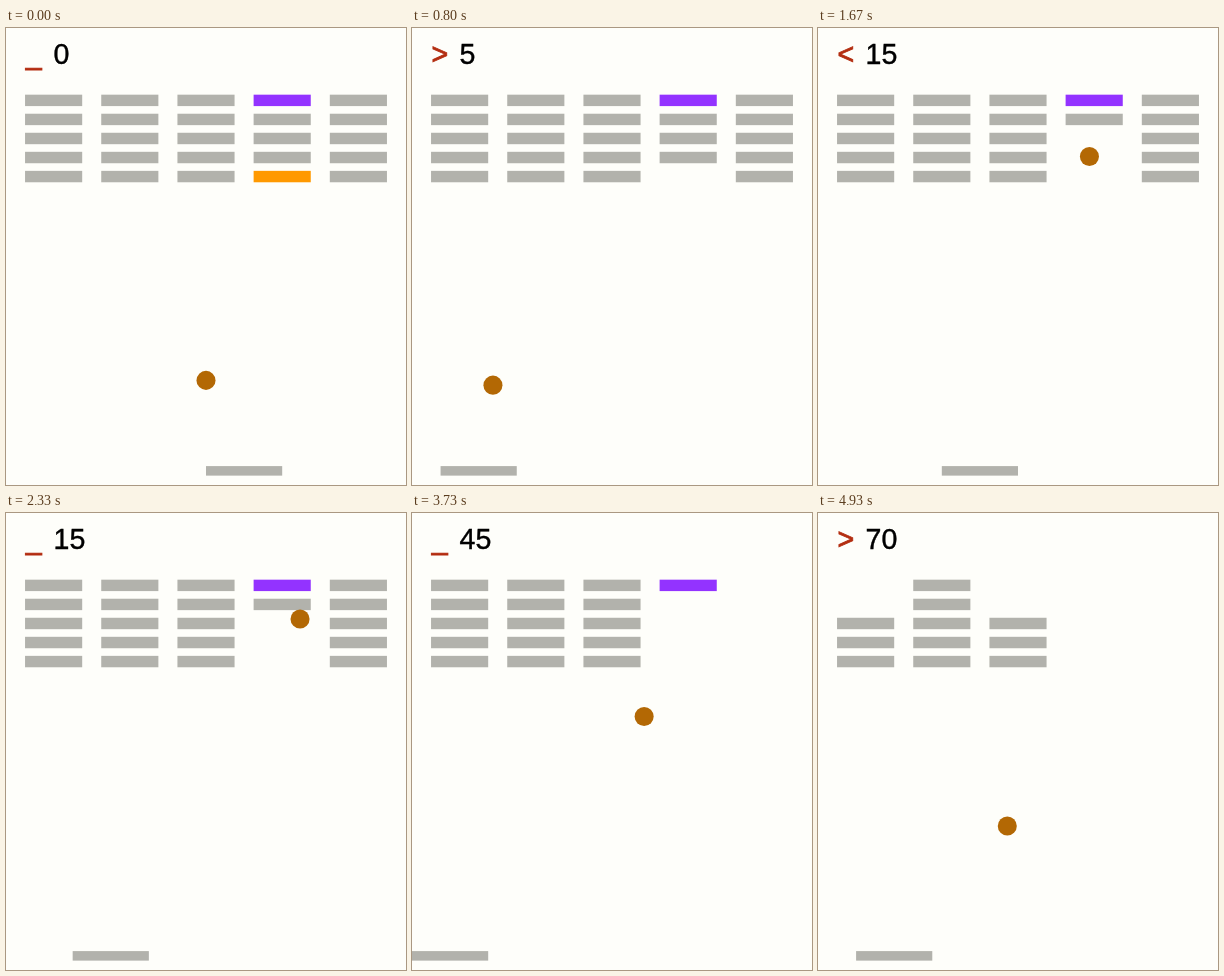
These frames come from a looping animation (400x457 px, 4990 ms). An HTML page:

```html
<!DOCTYPE html>
<html lang="en">
<head>
<meta charset="utf-8">
<title>Breakout</title>
<style>
  html, body { margin: 0; width: 100%; height: 100%; overflow: hidden; background: #fefefa; }
  svg { display: block; width: 100%; height: 100%; }
  text { font: 28.57px "Liberation Sans", Arial, sans-serif; }
</style>
</head>
<body>
<svg viewBox="0 0 400 457">
  <text id="move" x="27.8" y="36" text-anchor="middle" fill="#b32d10" stroke="#b32d10" stroke-width="0.8"></text>
  <text id="score" x="47.6" y="36" stroke="#000" stroke-width="0.4"></text>
  <g id="court" transform="scale(4.7619)"></g>
</svg>
<script>
const LOOP = 4990, STEPS = 75, STEP_MS = 200 / 3;
const TICKS_PER_STEP = 52.34;
const SPEED = 0.25;
const WIDTH = 84, RADIUS = 2, FLOOR = 90;
const PADDLE_WIDTH = 16, PADDLE_SPEED = 4;
const BRICK_WIDTH = 12, BRICK_HEIGHT = 2.4;
const GREY = '#b2b2ac', PURPLE = '#9333ff', ORANGE = '#ff9900';

// Where the player heads, and from which step on
const goals = [[0, 42], [2, 2], [12, 30], [25, 6], [31, 14], [36, 6], [46, 0], [73, 8]];

const clamp = (value, limit) => Math.max(-limit, Math.min(limit, value));
const snap = value => Math.round(value / SPEED) * SPEED;

function makeBricks() {
  const bricks = [];
  for (let col = 0; col < 5; col++) {
    for (let row = 0; row < 5; row++) {
      bricks.push({ col, row, x: 4 + 16 * col, y: 14 + 4 * row, goneAt: Infinity });
    }
  }
  return bricks;
}

function touches(ball, brick) {
  return ball.x > brick.x - RADIUS && ball.x < brick.x + BRICK_WIDTH + RADIUS &&
    ball.y >= brick.y - 0.5 && ball.y <= brick.y + 4;
}

function moveBall(ball, paddleX, bricks, step) {
  ball.x += ball.vx;
  ball.y += ball.vy;

  // The half of the paddle that is hit decides the side the ball leaves to
  const overPaddle = ball.x >= paddleX - RADIUS && ball.x <= paddleX + PADDLE_WIDTH + RADIUS;
  if (ball.y >= FLOOR && ball.vy > 0 && overPaddle) {
    ball.x = snap(ball.x);
    ball.y = FLOOR;
    ball.vx = ball.x < paddleX + PADDLE_WIDTH / 2 ? -SPEED : SPEED;
    ball.vy = -SPEED;
  }

  if (ball.x <= RADIUS) ball.vx = Math.abs(ball.vx);
  if (ball.x >= WIDTH - RADIUS) ball.vx = -Math.abs(ball.vx);
  if (ball.y <= RADIUS) ball.vy = Math.abs(ball.vy);

  const hit = bricks.find(brick => brick.goneAt > step && touches(ball, brick));
  if (hit) {
    hit.goneAt = step;
    ball.vy = -ball.vy;
  }
}

function playGame(bricks) {
  const ball = { x: 42, y: 74, vx: 1 / 15, vy: 2 / 15 };
  const history = [];
  let paddleX = goals[0][1], ticks = 0;
  for (let step = 0; step < STEPS; step++) {
    const goal = goals.filter(([start]) => start <= step).pop()[1];
    const shift = clamp(goal - paddleX, PADDLE_SPEED);
    paddleX += shift;
    for (; ticks < Math.floor(step * TICKS_PER_STEP); ticks++) moveBall(ball, paddleX, bricks, step);
    history.push({ x: ball.x, y: ball.y, paddleX, move: shift < 0 ? '<' : shift > 0 ? '>' : '_' });
  }
  return history;
}

const bricks = makeBricks();
const history = playGame(bricks);

const court = document.getElementById('court');
const moveText = document.getElementById('move');
const scoreText = document.getElementById('score');

function setAttributes(node, attrs) {
  for (const key in attrs) node.setAttribute(key, attrs[key]);
}

function add(tag, attrs) {
  const node = document.createElementNS('http://www.w3.org/2000/svg', tag);
  setAttributes(node, attrs);
  return court.appendChild(node);
}

function brickColor({ col, row }) {
  if (col !== 3) return GREY;
  return row === 0 ? PURPLE : row === 4 ? ORANGE : GREY;
}

for (const brick of bricks) {
  brick.node = add('rect', {
    x: brick.x, y: brick.y, width: BRICK_WIDTH, height: BRICK_HEIGHT, fill: brickColor(brick)
  });
}
const paddleNode = add('rect', { y: 92, width: PADDLE_WIDTH, height: 2, fill: GREY });
const ballNode = add('circle', { r: RADIUS, fill: '#b36804' });

// Steps begin on multiples of 10 ms
const stepStart = step => Math.round(step * STEP_MS / 10) * 10;

function stepAt(time) {
  let step = Math.min(STEPS - 1, Math.floor(time / STEP_MS) + 1);
  while (stepStart(step) > time) step--;
  return step;
}

function render(time) {
  const step = stepAt(time % LOOP);
  const { x, y, paddleX, move } = history[step];
  setAttributes(ballNode, { cx: x, cy: y });
  setAttributes(paddleNode, { x: paddleX });
  let score = 0;
  for (const { node, goneAt } of bricks) {
    const gone = goneAt <= step;
    if (gone) score += 5;
    setAttributes(node, { visibility: gone ? 'hidden' : 'visible' });
  }
  moveText.textContent = move;
  scoreText.textContent = score;
}

const origin = performance.now();
function tick() {
  render(performance.now() - origin);
  requestAnimationFrame(tick);
}
tick();
</script>
</body>
</html>
```
